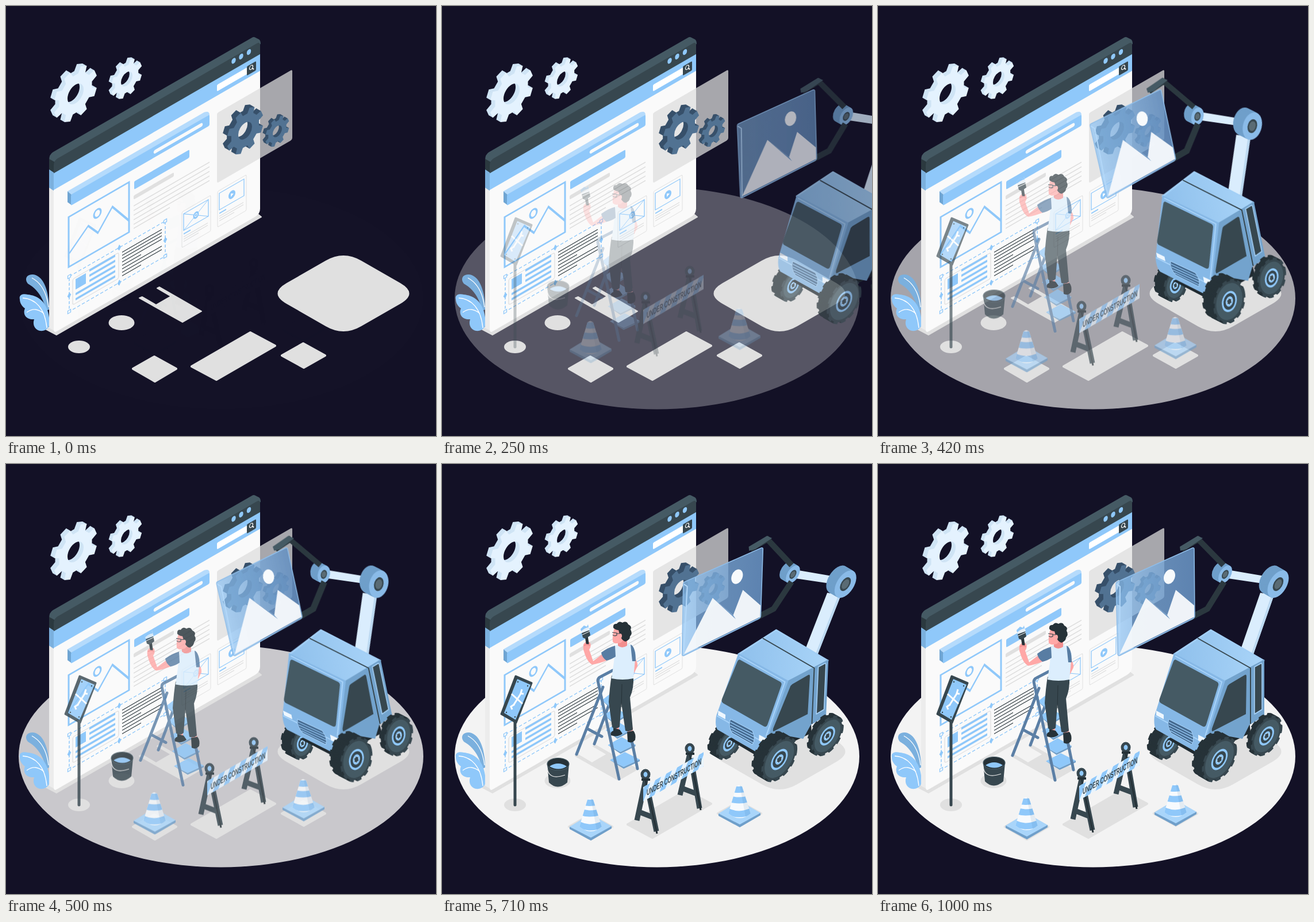
Write an HTML page that moves like this. It is 748 by 748 pixels and loops after 1.04 s.

```html
<!DOCTYPE html>
<html lang="en">
<head>
<meta charset="utf-8">
<title>Under construction</title>
<style>
html, body { margin: 0; height: 100%; overflow: hidden; background: #131126; }
svg { display: block; width: 100vw; height: 100vh; }
text { font: 700 15px "Liberation Sans", Arial, sans-serif; }
</style>
</head>
<body>
<svg viewBox="0 0 748 748" fill="none">
<defs>
  <linearGradient id="glass"><stop stop-color="#8fc4f4" stop-opacity=".7"/><stop offset="1" stop-color="#658fbf" stop-opacity=".9"/></linearGradient>
  <linearGradient id="roof"><stop stop-color="#8fc0ec"/><stop offset="1" stop-color="#a9d4f8"/></linearGradient>
  <clipPath id="coneShape"><path d="M253 582Q258 577 263 582L278 629Q259 645 239 629Z"/></clipPath>
  <clipPath id="board"><path d="M350 762H455V787H350Z"/></clipPath>
  <g id="cone">
    <path d="M222 629V633L259 653 295 632V628Z" fill="#6f9fca"/>
    <path d="M222 629L258 607 295 628 259 648Z" fill="#a9d5fa"/>
    <g clip-path="url(#coneShape)">
      <path d="M230 570H290V650H230Z" fill="#f7fafd"/>
      <path d="M235 583Q258 592 281 583M235 601Q258 611 281 601M235 624Q258 636 281 624" stroke="#8fc8fa" stroke-width="11"/>
      <path d="M258 575H285V650H272Z" fill="#37648f" opacity=".1"/>
    </g>
  </g>
  <g id="card">
    <path d="M306 537Q306 535 308 535H354Q356 535 356 537V595Q356 597 354 597H308Q306 597 306 595Z" fill="#fafafa" stroke="#e0e0e0"/>
    <path d="M309 540H352V569H309Z" stroke="#8fc8fa" stroke-width="1.3"/>
    <path d="M309 575H321" stroke="#8fc8fa" stroke-width="2"/>
    <path d="M309 580H351M309 584H351M309 588H335" stroke="#dcdcdc" stroke-width="1.3"/>
  </g>
</defs>

<ellipse id="floor" cx="374" cy="508.400" rx="352" ry="193" fill="#f3f3f3"/>

<g id="shadows" fill="#e0e0e0" stroke="#e0e0e0" stroke-linejoin="round">
  <g stroke="none">
    <ellipse cx="201" cy="551" rx="22.5" ry="13"/><ellipse cx="127" cy="593" rx="19" ry="11"/>
    <path d="M488 482L556 443Q587 425 618 443L686 482Q717 500 686 518L618 557Q587 575 556 557L488 518Q457 500 488 482Z"/>
  </g>
  <path d="M232 508L237 506 261 520 287 505 263 491 267 489 340 531 307 550Z" stroke-width="2"/>
  <path d="M221 631L258 610 296 631 259 653ZM480 608L517 587 555 608 518 629ZM323 627L425 568 468 591 366 650Z" stroke-width="4"/>
  <path d="M69 562L88 572 444 367 438 362Z" stroke-width="2"/>
</g>

<g id="plant" stroke="#fff" stroke-width="1.3">
  <path d="M75 528C75 495 65 468 46 467C35 467 32 476 38 483C54 492 64 506 70 530Z" fill="#7bb0de" stroke="none"/>
  <path d="M45 473C62 482 71 500 74 524"/>
  <path d="M24 510C22 502 30 500 38 502C58 504 75 517 76 553C75 562 66 566 59 565C49 563 46 553 49 545C37 546 28 538 33 526C27 522 24 516 24 510Z" fill="#8fc8fa" stroke="none"/>
  <path d="M29 508C51 509 68 526 71 560M36 533C47 525 56 527 66 535"/>
</g>

<g id="window">
  <path d="M75 314L84 319V566L88 567 75 560Z" fill="#ececec"/>
  <path d="M75 284L84 290V322L75 316Z" fill="#7bb0de"/>
  <path d="M75 268Q75 258 82 254L428 55Q431 53 434 55L440 58Q443 60 443 66L84 290 75 284Z" fill="#455a64"/>
  <path d="M75 266L84 271V290L75 284Z" fill="#2b393f"/>
  <g transform="skewY(-30)">
    <path d="M83 367H442V608Q442 617 433 617H89Q83 617 83 611Z" fill="#fafafa"/>
    <path d="M83 338H442V368H83Z" fill="#8fc8fa"/>
    <path d="M83 339V325Q83 317 90 317H436Q442 317 442 323V339Z" fill="#37474f"/>
    <g fill="#8fc8fa"><ellipse cx="396" cy="324" rx="3.7" ry="4.6"/><ellipse cx="409" cy="324" rx="3.7" ry="4.6"/><ellipse cx="422.500" cy="324" rx="3.7" ry="4.6"/></g>
    <rect x="367" y="349" width="55" height="11.500" rx="2" fill="#fff"/>
    <rect x="419" y="347" width="16" height="16" rx="1.500" fill="#37474f"/>
    <path d="M428 355L431 359" stroke="#fff" stroke-width="1.5"/>
    <ellipse cx="426.500" cy="353" rx="3" ry="3.500" stroke="#fff" stroke-width="1.2"/>

    <path d="M114 394L107 384H345Q354 386 354 394Z" fill="#b5dbfc"/>
    <path d="M107 384L114 394V412L107 403Z" fill="#6fa5d3"/>
    <rect x="113" y="393.500" width="241" height="19" rx="2" fill="#8fc8fa"/>
    <path d="M260 403H339" stroke="#fafafa" stroke-width="6.500" stroke-linecap="round"/>

    <path d="M109 430H214V517H109Z" stroke="#8fc8fa" stroke-width="3"/>
    <path d="M110 494L143 465 160 487 185 456 214 497" stroke="#8fc8fa" stroke-width="3"/>
    <ellipse cx="159" cy="452.500" rx="6" ry="7" stroke="#8fc8fa" stroke-width="3"/>

    <rect x="223" y="434" width="96" height="14" rx="2" fill="#8fc8fa"/>
    <rect x="222" y="458" width="70" height="7" rx="2" fill="#e0e0e0"/>
    <path d="M222 476H354M222 484H354M222 492H354M222 500H354M222 508H354M222 515H285" stroke="#dedede" stroke-width="1.700"/>

    <rect x="116" y="542" width="80" height="45" rx="3" stroke="#e0e0e0" stroke-width="1.300"/>
    <path d="M121 545H139V563H121Z" fill="#8fc8fa"/>
    <path d="M145 544H190M145 553H190M145 562H190M121 571H190M121 580H190" stroke="#8fc8fa" stroke-width="4"/>
    <path d="M202 545H271M202 550.500H271M202 556H271M202 562H271M202 568H235M202 574H271M202 580H271M202 586H235" stroke="#263238" stroke-width="1.300"/>
    <path d="M110 534H277V595H110Z" stroke="#8fc8fa" stroke-width="1.500" stroke-dasharray="5 3"/>
    <g id="handles" fill="#fafafa" stroke="#8fc8fa" stroke-width="1.300"></g>

    <use href="#card"/><use href="#card" x="62"/>
    <path d="M309 540L352 569M352 540L309 569" stroke="#8fc8fa"/>
    <ellipse cx="330.500" cy="554.500" rx="5" ry="6" fill="#8fc8fa"/><ellipse cx="330.500" cy="554.500" rx="2" ry="2.500" stroke="#fafafa"/>
    <ellipse cx="393" cy="555" rx="6" ry="7" fill="#8fc8fa"/><path d="M391 552L396 555 391 558Z" fill="#fff"/>
    <rect x="367" y="398" width="131" height="122" rx="3" fill="#dfdfdf" fill-opacity=".73"/>
  </g>
</g>

<g id="gears"></g>

<g id="sign">
  <path d="M127 442V593" stroke="#37474f" stroke-width="5" stroke-linecap="round"/>
  <path d="M128 369L156 381 129 450 103 435Z" fill="#37474f" stroke="#37474f" stroke-width="3" stroke-linejoin="round"/>
  <path d="M131 374L154 384 128 445 108 433Z" fill="#8fc8fa"/>
  <path d="M121 400L140 417M138 398L124 420" stroke="#fff" stroke-width="3"/>
  <path d="M139 392L137 399 142 400M126 418L120 422 122 427" stroke="#fff" stroke-width="3"/>
  <g fill="#37474f"><circle cx="132" cy="379" r="1.200"/><circle cx="149" cy="386" r="1.200"/><circle cx="112" cy="432" r="1.200"/><circle cx="127" cy="440" r="1.200"/></g>
</g>

<g id="climber">
  <g stroke="#5b7fa5" stroke-width="5" stroke-linecap="round">
    <path d="M280 390L234 507M299 398L265 489M252 462L278 476"/>
  </g>
  <g id="steps" fill="#8fc8fa"></g>
  <g stroke="#5b7fa5" stroke-width="5" stroke-linecap="round" stroke-linejoin="round">
    <path d="M308 375L340 532"/>
    <path d="M308 550L271 379Q271 374 276 372L297 361"/>
  </g>
  <g id="man">
    <path d="M333 337Q341 345 340 354L334 366 329 350Z" fill="#ffa8a7"/>
    <path d="M299 456H308V470H299ZM323 460H332V476H323Z" fill="#ffa8a7"/>
    <path d="M298 461L309 464 314 471Q306 478 294 474Q292 468 298 466ZM322 468L333 466Q338 472 336 482Q330 489 323 485Z" fill="#263238"/>
    <path d="M295 370H333Q334 392 327 408L332 464Q326 469 319 466L312 418 309 459Q303 465 296 460L290 416Q292 388 295 370Z" fill="#37474f"/>
    <path d="M313 385L312 425" stroke="#263238"/>
    <path d="M281 331L263 345 256 325Q261 318 257 312Q250 309 246 316Q245 324 247 328Q252 346 261 351Q271 350 291 342Z" fill="#ffa8a7"/>
    <path d="M302 317Q318 312 330 317L337 330 333 375Q314 379 295 375L299 346Z" fill="#dceefd"/>
    <path d="M301 318Q289 321 277 330Q278 338 286 344Q295 342 302 337ZM328 316Q337 320 337 345L331 345Z" fill="#587da3"/>
    <path d="M306 307H322V318Q313 324 306 318Z" fill="#f28f8f"/>
    <path d="M300 287Q296 299 297 311Q300 316 311 313L321 303 318 287Z" fill="#ffa8a7"/>
    <path d="M298 287Q297 279 304 280Q308 274 314 278Q321 274 324 281Q331 284 328 290Q332 297 327 302Q327 308 319 311Q312 309 309 298L307 291Q302 291 298 287Z" fill="#263238"/>
    <ellipse cx="310" cy="301" rx="3" ry="4" fill="#ffa8a7"/>
    <path d="M296 295L304 296V300Q299 302 297 299M304 297H309" stroke="#37474f" stroke-width="1.200"/>
    <path d="M253 314L251 301" stroke="#263238" stroke-width="5" stroke-linecap="round"/>
    <path d="M243 296L256 290 258 300 250 306 245 304Z" fill="#37474f"/>
    <path d="M243 296L241 289 247 283 252 285 254 281 257 291Z" fill="#e6f0f9"/>
    <path d="M241 289L247 283 252 285 254 281 255 286Q248 287 242 293Z" fill="#8fc8fa"/>
    <path d="M244 299L257 293" stroke="#fff"/>
    <path d="M247 318Q252 314 257 318" stroke="#f28f8f" stroke-width="2"/>
  </g>
</g>

<g id="props">
  <g id="bucket">
    <path d="M183 520L186 552Q201 567 218 552L221 520Z" fill="#37474f"/>
    <ellipse cx="202" cy="520" rx="19" ry="10.500" fill="#263238" stroke="#455a64" stroke-width="1.200"/>
    <path d="M187 524Q202 514 217 524Q203 533 187 524Z" fill="#8fc8fa"/>
    <path d="M183 526Q185 549 214 539" stroke="#e8e8e8" stroke-width="1.300"/>
  </g>
  <use href="#cone"/><use href="#cone" x="259" y="-23"/>
  <g stroke="#37474f" stroke-width="9" stroke-linejoin="round">
    <path d="M354 548L339 618M357 560L373 637M345 604L368 613M431 502L414 574M433 510L448 597M420 563L444 572"/>
  </g>
  <path d="M354 548L374 641M431 504L450 600" stroke="#263238" stroke-width="3"/>
  <g stroke="#37474f" stroke-width="5" fill="#8fc8fa"><ellipse cx="354" cy="538" rx="6" ry="7"/><ellipse cx="431" cy="493" rx="6" ry="7"/></g>
  <path d="M347 547H362M424 502H439" stroke="#263238" stroke-width="4"/>
  <g transform="skewY(-30)" clip-path="url(#board)">
    <path d="M350 762H455V787H350Z" fill="#e8f4fe"/>
    <path id="stripes" stroke="#8fc8fa" stroke-width="9"/>
  </g>
  <text transform="matrix(.535 -.309 0 1 356 575)" fill="#37474f">UNDER CONSTRUCTION</text>
</g>

<g id="truck">
  <g id="farWheel"></g>
  <path d="M503 478L560 511 648 468 646 446Z" fill="#202a30"/>
  <path d="M629 328L665 224 689 228 653 331Z" fill="#daedfd"/>
  <path d="M649 331L685 227 689 228 653 331Z" fill="#bcd9f1"/>
  <g id="cab" stroke-linejoin="round">
    <path d="M515 331L579 289 671 342 603 379Z" fill="url(#roof)" stroke="#a2cff6" stroke-width="3"/>
    <path d="M603 377L672 340V438L646 454 634 478 590 470 573 512 556 505Z" fill="#73a3cd"/>
    <path d="M515 329L604 377 574 470 573 512 484 462Q479 455 481 438Z" fill="#86b8e6"/>
    <path d="M517 334L598 379 569 474M482 438L572 488" stroke="#a9d4fa" stroke-width="2"/>
    <path d="M519 341L590 379Q593 381 592 385L571 453Q569 459 564 456L492 416Q488 414 490 408L514 343Q516 339 519 341Z" fill="#455a64"/>
    <path d="M611 383L638 367Q641 365 641 370L640 435 582 465Q580 465 581 460L607 389Q608 385 611 383Z" fill="#37474f"/>
    <path d="M655 353L666 347Q668 346 668 350V427L655 435Z" fill="#37474f" stroke="#a9d4fa" stroke-width="1.500"/>
    <path d="M556 303L648 355V452" stroke="#37474f" stroke-width="2"/>
    <path d="M484 429L497 436V444L484 437ZM557 471L571 478V488L557 481Z" fill="#eef7ff"/>
    <path d="M506 444L545 464Q552 478 546 488L510 468Q502 456 506 444Z" fill="#456a90" stroke="#a9d4fa"/>
    <path d="M506 449L547 470M506 454L548 475M507 459L548 480M509 464L547 485" stroke="#8fc0ec" stroke-width="1.500"/>
  </g>
  <g id="wheels"></g>

  <path d="M602 183L690 198V211L602 198Z" fill="#daedfd"/>
  <g id="joints"></g>
  <path d="M602 205L573 252 542 268" stroke="#2b383f" stroke-width="10"/>
  <path d="M416 205L547 146Q550 145 550 148L551 264Q551 267 548 269L421 333Q417 335 417 330L414 209Q414 206 416 205Z" fill="url(#glass)" stroke="#8fbde8" stroke-width="1.500"/>
  <path d="M420 331L466 233 503 263 518 219 550 246V266Z" fill="#f5f8fb" opacity=".96"/>
  <path d="M466 233L503 263 508 270Z" fill="#6d97c4"/>
  <ellipse cx="507" cy="196" rx="9.500" ry="13" transform="rotate(20 507 196)" fill="#f7fafc"/>
  <path d="M415 209L421 213 420 332" stroke="#b4d9fa" stroke-width="2"/>
  <path d="M528 148L557 131 601 176" stroke="#2b383f" stroke-width="10"/>
  <path d="M525 144L556 125 565 129 537 148 526 151Z" fill="#455a64"/>
</g>
</svg>

<script>
const $ = id => document.getElementById(id);
const range = (n, f) => Array.from({ length: n }, (_, i) => f(i));
const fill = (id, ...parts) => $(id).innerHTML = parts.flat().join('');

// A circle drawn in this plane faces the same way as the window.
const plane = (x, y, body) => `<g transform="matrix(1 -.577 0 1.155 ${x} ${y})">${body}</g>`;
const extrude = (x, y, depth, body) =>
  range(depth, i => plane(x - .87 * (depth - i), y - .5 * (depth - i), body)).join('');

function gear(x, y, r, hole, depth, front, side) {
  const pts = range(32, i => {
    const a = (Math.floor(i / 4) + .5 + [-.29, -.19, .19, .29][i % 4]) * Math.PI / 4;
    const q = i % 4 % 3 ? r : r * .76;
    return `${(q * Math.cos(a)).toFixed(1)} ${(q * Math.sin(a)).toFixed(1)}`;
  });
  const d = `M${pts.join('L')}ZM${hole} 0A${hole} ${hole} 0 1 0 ${-hole} 0A${hole} ${hole} 0 1 0 ${hole} 0Z`;
  const shape = c => `<path fill-rule="evenodd" d="${d}" fill="${c}"/>`;
  return extrude(x, y, depth, shape(side)) + plane(x, y, shape(front));
}

const disc = (r, c, extra = '') => `<circle r="${r}" fill="${c}" ${extra}/>`;

function wheel(x, y, r, depth) {
  const tread = c => disc(r - 1, c, `stroke="${c}" stroke-width="5" stroke-dasharray="8 6"`);
  return extrude(x, y, depth, tread('#263238')) + plane(x, y,
    tread('#37474f') + disc(r - 4, '#455a64') + disc(r * .44, '#37474f', 'stroke="#8fc8fa" stroke-width="3"') +
    disc(r * .24, '#8fc8fa') + disc(r * .14, '#37474f', 'stroke="#d4eafd" stroke-dasharray="2 2"'));
}

const joint = (x, y, r, depth) => extrude(x, y, depth, disc(r, '#6f9fca')) +
  plane(x, y, disc(r, '#8abbe8') + disc(r * .5, '#37474f') + disc(r * .35, '#5a6b74'));

fill('gears',
  gear(121, 153, 38, 14, 8, '#e4f2fe', '#cfe4f5'),
  gear(210, 127, 27, 10, 6, '#e4f2fe', '#cfe4f5'),
  gear(416, 217, 32, 12, 9, '#517292', '#37506a'),
  gear(472, 218, 21, 8, 6, '#517292', '#37506a'));
fill('farWheel', wheel(506, 486, 21, 18));
fill('wheels', wheel(676, 473, 26, 9), wheel(594, 514, 29, 20));
fill('joints', joint(604, 192, 12, 13), joint(696, 209, 18.5, 17));
fill('steps', range(5, i => {
  const x = 318 - i * 5.5, y = 516 - i * 26, w = 26 - i * 2;
  return `<path d="M${x - w} ${y + 1}L${x} ${y - 13} ${x + w} ${y} ${x - 2} ${y + 13}Z"/>` +
    `<path d="M${x - w} ${y + 1}L${x - 2} ${y + 13} ${x + w} ${y}v3L${x - 2} ${y + 16}Z" fill="#6f9fca"/>`;
}));
fill('handles',
  [110, 277].flatMap(x => [534, 595].map(y => `<rect x="${x - 2.5}" y="${y - 2.5}" width="5" height="5"/>`)),
  [[197, 534], [277, 567], [197, 595], [110, 567]].map(([x, y]) =>
    `<path d="M${x - 2.5} ${y}l2.500 -4 2.500 4 -2.500 4Z" fill="#8fc8fa"/>`));
$('stripes').setAttribute('d', range(7, i => `M${343 + i * 19} 792l16 -34`).join(''));

function ease(x) {
  const curve = (a, b, s) => 3 * a * s * (1 - s) ** 2 + 3 * b * s * s * (1 - s) + s ** 3;
  let lo = 0, hi = 1;
  for (let i = 0; i < 24; i++) {
    const mid = (lo + hi) / 2;
    if (curve(.36, .5, mid) < x) lo = mid; else hi = mid;
  }
  return curve(-.01, 1.38, lo);
}

const LOOP = 1040, RISE = 45, SLIDE = 345, PIVOT = 345;

// The truck slides in leaning back, tips forward, rocks and settles.
function truckPose(x) {
  if (x < .6) {
    const p = ease(x / .6);
    return { shift: SLIDE * (1 - p), lean: -20 + 30 * p, alpha: p };
  }
  if (x < .8) return { shift: 0, lean: 10 - 12 * ease((x - .6) / .2), alpha: 1 };
  return { shift: 0, lean: -2 * (1 - ease((x - .8) / .2)), alpha: 1 };
}

function place(id, alpha, transform) {
  $(id).setAttribute('opacity', Math.max(0, Math.min(1, alpha)));
  if (transform) $(id).setAttribute('transform', transform);
}

function draw(now) {
  const step = Math.min(24, Math.floor((now % LOOP + 4) * 24 / 1000)); // 24 pictures a second
  const x = Math.min(1, (step + .9) / 24), p = ease(x), off = RISE * (1 - p);
  place('floor', p);
  place('sign', p);
  place('climber', p, `translate(0 ${off})`);
  place('props', p, `translate(0 ${-off})`);
  const { shift, lean, alpha } = truckPose(x);
  const k = Math.tan(lean * Math.PI / 180);
  place('truck', alpha, `matrix(1 0 ${k} 1 ${shift - k * PIVOT} 0)`);
}

const start = performance.now();
function tick() {
  draw(performance.now() - start);
  requestAnimationFrame(tick);
}
tick();
</script>
</body>
</html>
```
